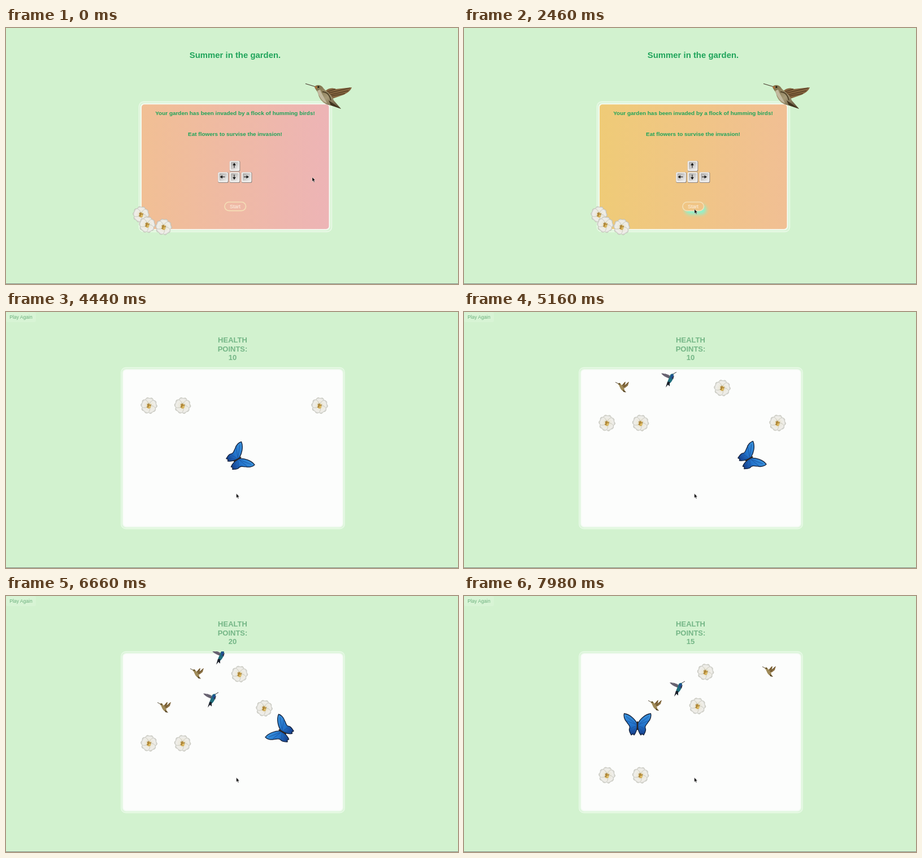
An HTML page that plays this animation: 800 px wide and 453 px high, repeating every 8 s.

```html
<!DOCTYPE html>
<html lang="en">
<head>
<meta charset="utf-8">
<title>Summer in the garden</title>
<style>
html, body { margin: 0; width: 100%; height: 100%; overflow: hidden; background: #d2f2cf; }
svg { display: block; width: 800px; height: 453px; }
text { font-family: "Liberation Sans", Arial, sans-serif; text-anchor: middle; }
.bold { font-weight: bold; fill: #1fa45a; }
.score { font-weight: bold; font-size: 13px; fill: #74b686; }
</style>
</head>
<body>
<svg viewBox="0 0 800 453">
  <defs>
    <linearGradient id="sky" gradientUnits="userSpaceOnUse" x1="-424" x2="904" y1="0" y2="0">
      <stop offset="0" stop-color="#eed462"/>
      <stop offset=".25" stop-color="#efcb77"/>
      <stop offset=".5" stop-color="#f1bf94"/>
      <stop offset=".75" stop-color="#edb4b6"/>
      <stop offset="1" stop-color="#ebacc2"/>
    </linearGradient>
    <radialGradient id="petal" gradientUnits="userSpaceOnUse" cx="0" cy="0" r="15">
      <stop offset="0" stop-color="#d8c588"/>
      <stop offset=".35" stop-color="#ece9dc"/>
      <stop offset=".75" stop-color="#efeeea"/>
      <stop offset="1" stop-color="#c3c4bd"/>
    </radialGradient>
    <linearGradient id="key" x1="0" y1="0" x2="1" y2="1">
      <stop offset="0" stop-color="#aaa8a6"/>
      <stop offset="1" stop-color="#efeeed"/>
    </linearGradient>
    <linearGradient id="wing" x1="0" y1="0" x2="0" y2="1">
      <stop offset="0" stop-color="#3b93dc"/>
      <stop offset=".55" stop-color="#2273cb"/>
      <stop offset="1" stop-color="#163b86"/>
    </linearGradient>
    <linearGradient id="belly" x1="0" y1="0" x2="1" y2="1">
      <stop offset="0" stop-color="#75683f"/>
      <stop offset=".5" stop-color="#a79a78"/>
      <stop offset="1" stop-color="#4d4127"/>
    </linearGradient>
    <filter id="glow" x="-50%" y="-100%" width="200%" height="300%"><feGaussianBlur stdDeviation="3.2"/></filter>
    <clipPath id="field"><rect x="204" y="98" width="395" height="285" rx="8"/></clipPath>

    <g id="flower"></g>

    <g id="halfwing">
      <path d="M0-1C4-10 14-19 23.5-20C25-16 23-9 19-5C17-1 12 2 14 6C16 10 13 14 11 18L8 16L6 18C2 14 1 8 0 2Z" fill="url(#wing)" stroke="#142039" stroke-width="1.3" stroke-linejoin="round"/>
      <path d="M1 0L20-15M1 0L19-7M1 1L13 7M1 2L9 15" stroke="#174d9c" stroke-width=".7" fill="none"/>
    </g>
    <g id="butterfly">
      <use href="#halfwing"/>
      <use href="#halfwing" transform="scale(-1 1)"/>
      <path d="M0-5V8" stroke="#2b2424" stroke-width="2.4" stroke-linecap="round"/>
    </g>

    <g id="brown">
      <path d="M-12-8L-6-5" stroke="#4a4029" stroke-width=".9"/>
      <path d="M-2-1L4-8L6-9L5-3L12-9L10-2L5 2L0 3Z" fill="#8a6f42"/>
      <path d="M-1 0L5-7M2 1L11-8" stroke="#594421" stroke-width="1"/>
      <path d="M-8-5C-6-8-3-7-2-4C2-1 4 3 4 6L7 10L2 8C-3 6-4 0-6-3Z" fill="#9f8a58"/>
      <path d="M1 5L7 10L2 9Z" fill="#4d3d21"/>
      <circle cx="-5" cy="-5" r="1" fill="#342c1a"/>
    </g>

    <g id="blue">
      <path d="M7-9L14-13" stroke="#22262c" stroke-width=".9"/>
      <path d="M4-1C-2-3-9-5-13-11C-6-11 2-9 5-4Z" fill="#77717f"/>
      <path d="M3-2L-11-10M2-4L-6-10" stroke="#4a4655" stroke-width=".8"/>
      <path d="M3-8C5-11 9-11 9-8C9-3 7 3 2 7L-2 5C-1 0 2-4 3-8Z" fill="#216e7c"/>
      <path d="M4-8C7-10 9-9 8-5L4 0Z" fill="#214f94"/>
      <path d="M2 4L2 12L-1 9L-5 14L-2 4Z" fill="#191e28"/>
      <path d="M6-3L10-7L8 0Z" fill="#343044"/>
    </g>

    <g id="hummer">
      <path d="M530 98.5L548 104" stroke="#4a3d30" stroke-width="1.3"/>
      <path d="M561 117C566 108 575 104 584 108L612 105C610 111 604 115 598 118L578 125Z" fill="#85653f"/>
      <path d="M567 116L609 106M570 119L606 111M572 121L600 116M565 114L583 108" stroke="#49351f" stroke-width="1.2"/>
      <path d="M546 104C549 100 556 100 560 104C564 111 577 117 580 128L593 143L577 137C564 137 555 127 553 118C552 112 547 109 546 104Z" fill="url(#belly)"/>
      <path d="M551 111C553 118 557 128 568 133C563 123 558 115 556 109Z" fill="#c3b99f"/>
      <path d="M571 128L593 143L575 137Z" fill="#40341f"/>
      <path d="M560 113C568 113 573 119 575 128" stroke="#50432a" stroke-width="2" fill="none"/>
      <path d="M546 104L550 103L550 108Z" fill="#b57038"/>
      <circle cx="553" cy="104.5" r="1.4" fill="#17130e"/>
    </g>
  </defs>

  <rect width="800" height="453" fill="#d2f2cf"/>

  <g id="intro">
    <text class="bold" x="405.5" y="53" font-size="14.9">Summer in the garden.</text>
    <rect x="235.5" y="130.5" width="341" height="230" rx="8" fill="#d9f4d6" stroke="#edfaeb" stroke-width="1.3"/>
    <rect x="239" y="134.3" width="333.5" height="222.4" rx="6" fill="url(#sky)" stroke="#f5fbf2" stroke-width="2"/>
    <use href="#hummer"/>
    <text class="bold" x="405.5" y="154.4" font-size="9.95">Your garden has been invaded by a flock of humming birds!</text>
    <text class="bold" x="405.5" y="191.4" font-size="9.95">Eat flowers to survise the invasion!</text>
    <g id="keys"></g>
    <rect id="halo" x="391" y="313" width="38" height="17" rx="8.5" fill="#8cf3cc" filter="url(#glow)"/>
    <rect id="pill" x="387" y="308" width="37.5" height="15.4" rx="7.7" stroke="#f5e0b6" stroke-width="1.6"/>
    <text x="405.5" y="318.8" font-size="9" fill="#fdf3e6">Start</text>
    <use href="#flower" x="239" y="330"/>
    <use href="#flower" x="250" y="348"/>
    <use href="#flower" x="279" y="352"/>
  </g>

  <g id="game">
    <rect width="53" height="18" rx="3" fill="#d8f4d5"/>
    <text x="26.5" y="12" font-size="8.6" fill="#6cb07d">Play Again</text>
    <text class="score" x="401" y="54.2">HEALTH</text>
    <text class="score" x="401" y="69.6">POINTS:</text>
    <text class="score" x="401" y="84.9" id="score">10</text>
    <rect x="203.8" y="98.5" width="395.4" height="285" rx="8" fill="#dcf5da" stroke="#eafae8" stroke-width="1.3"/>
    <rect x="206.8" y="101.8" width="389.4" height="278.6" rx="6" fill="#fcfdfc" stroke="#f0faef" stroke-width="1.6"/>
    <g id="items" clip-path="url(#field)"></g>
    <use id="hero" href="#butterfly"/>
  </g>

  <path d="M0 452.5H800" stroke="#858c85"/>
  <path id="cursor" d="M0 0V7.6L1.7 6.1L3 9L4.3 8.4L3 5.6H5.4Z" fill="#080808" stroke="#f4f4f4" stroke-width=".5"/>
</svg>

<script>
const LOOP = 8000, STEP = 60, GAME = 3000, FALL = 0.0428, TOP = 104;
const $ = id => document.getElementById(id);
const svgUse = (id, x) => `<use href="#${id}" x="${x}"/>`;

// kind, x, birth, death
const ITEMS = [
  ['flower', 253, 3000], ['flower', 312.5, 3000], ['flower', 555, 3000, 5560],
  ['flower', 457, 4448, 6780], ['flower', 413.3, 5861], ['flower', 427.5, 7268],
  ['brown', 280, 4500, 7820], ['brown', 338, 5900], ['brown', 540, 7302],
  ['blue', 362, 4800, 7400], ['blue', 377, 6580]
];
const HEALTH = [[0, 10], [5560, 20], [6780, 30], [7400, 25], [7820, 15]];

// time, x, y; turns are hard changes
const PATH = [
  [0, 407, 261], [4410, 407, 260], [5160, 506, 259], [5430, 540, 259],
  [5640, 540, 240], [5760, 540, 240], [6000, 508, 240], [6510, 508, 240],
  [7260, 408, 238], [7800, 332, 238], [7980, 307, 228]
];
const TURNS = [[0, 0], [4410, 60], [5430, 0], [5760, -60], [7800, 0]];
const POINTER = [[0, 542, 264], [1080, 542, 264], [2160, 408, 320.3], [3000, 407.7, 321.3]];

const current = (rows, t) => rows.filter(r => r[0] <= t).pop()[1];

function along(rows, t, ease = k => k) {
  const i = rows.findIndex(r => r[0] > t);
  if (i < 0) return rows[rows.length - 1].slice(1);
  const a = rows[i - 1], b = rows[i];
  const k = ease((t - a[0]) / (b[0] - a[0]));
  return [a[1] + (b[1] - a[1]) * k, a[2] + (b[2] - a[2]) * k];
}

function buildFlower() {
  let out = '';
  for (let i = 0; i < 5; i++) {
    out += `<path transform="rotate(${i * 72 + 4})" d="M0 0C-9-4-9-13-3-14L0-13L4-14C9-12 8-4 0 0Z"
      fill="url(#petal)" stroke="#b9b9ad" stroke-width=".6"/>`;
  }
  out += '<ellipse cy="1" rx="3.3" ry="4.2" fill="#d1aa50"/>';
  out += '<path d="M-3-3L0 3L4-2M-1-4L1 2M-4 3L1 1" fill="none" stroke="#8d6526" stroke-width="1"/>';
  out += '<circle cx="1" cy="2" r="1.7" fill="#e4c36b"/>';
  return out;
}

function buildKeys() {
  const key = (x, y, turn) => `<g transform="translate(${x} ${y})">
    <rect x="-9.2" y="-9.2" width="18.6" height="18.6" rx="2" fill="#8f8581"/>
    <rect x="-9.2" y="-9.2" width="17.6" height="17.6" rx="2" fill="#f0eeec"/>
    <rect x="-7" y="-7.6" width="13.6" height="13.6" rx="1.5" fill="url(#key)"/>
    <path transform="translate(-1 -1) rotate(${turn})" d="M0 4V-2M-1.8-1L0-4L1.8-1Z"
      fill="#161616" stroke="#161616" stroke-width="1.1"/></g>`;
  return key(405, 244.5, 0) + key(384.5, 264.5, -90) + key(405, 264.5, 180) + key(426, 264.5, 90);
}

$('flower').innerHTML = buildFlower();
$('keys').innerHTML = buildKeys();
$('items').innerHTML = ITEMS.map(([kind, x]) => svgUse(kind, x)).join('');
const sprites = [...$('items').children];
const show = (el, on) => el.setAttribute('visibility', on ? 'visible' : 'hidden');
const smooth = k => k * k * (3 - 2 * k);

function drawIntro(t) {
  const shift = Math.max(0, t - 1080) / 1380 * 332;
  $('sky').setAttribute('gradientTransform', `translate(${shift})`);
  const hover = t >= 1920;
  $('halo').setAttribute('opacity', hover ? 1 : 0);
  $('pill').setAttribute('fill', hover ? 'url(#sky)' : 'none');
}

function drawGame(t) {
  ITEMS.forEach(([, , born, dies = LOOP], i) => {
    const alive = t >= born && t < dies;
    sprites[i].setAttribute('display', alive ? 'inline' : 'none');
    sprites[i].setAttribute('y', TOP + (t - born) * FALL);
  });
  const [x, y] = along(PATH, t);
  $('hero').setAttribute('transform', `translate(${x} ${y}) rotate(${current(TURNS, t)})`);
  $('score').textContent = current(HEALTH, t);
}

function draw(now) {
  const t = Math.floor(now % LOOP / STEP) * STEP;
  const playing = t >= GAME;
  $('intro').setAttribute('display', playing ? 'none' : 'inline');
  show($('game'), playing);
  if (playing) drawGame(t); else drawIntro(t);
  $('cursor').setAttribute('transform', `translate(${along(POINTER, t, smooth)})`);
}

const start = performance.now();
function tick() {
  draw(performance.now() - start);
  requestAnimationFrame(tick);
}
tick();
</script>
</body>
</html>
```
